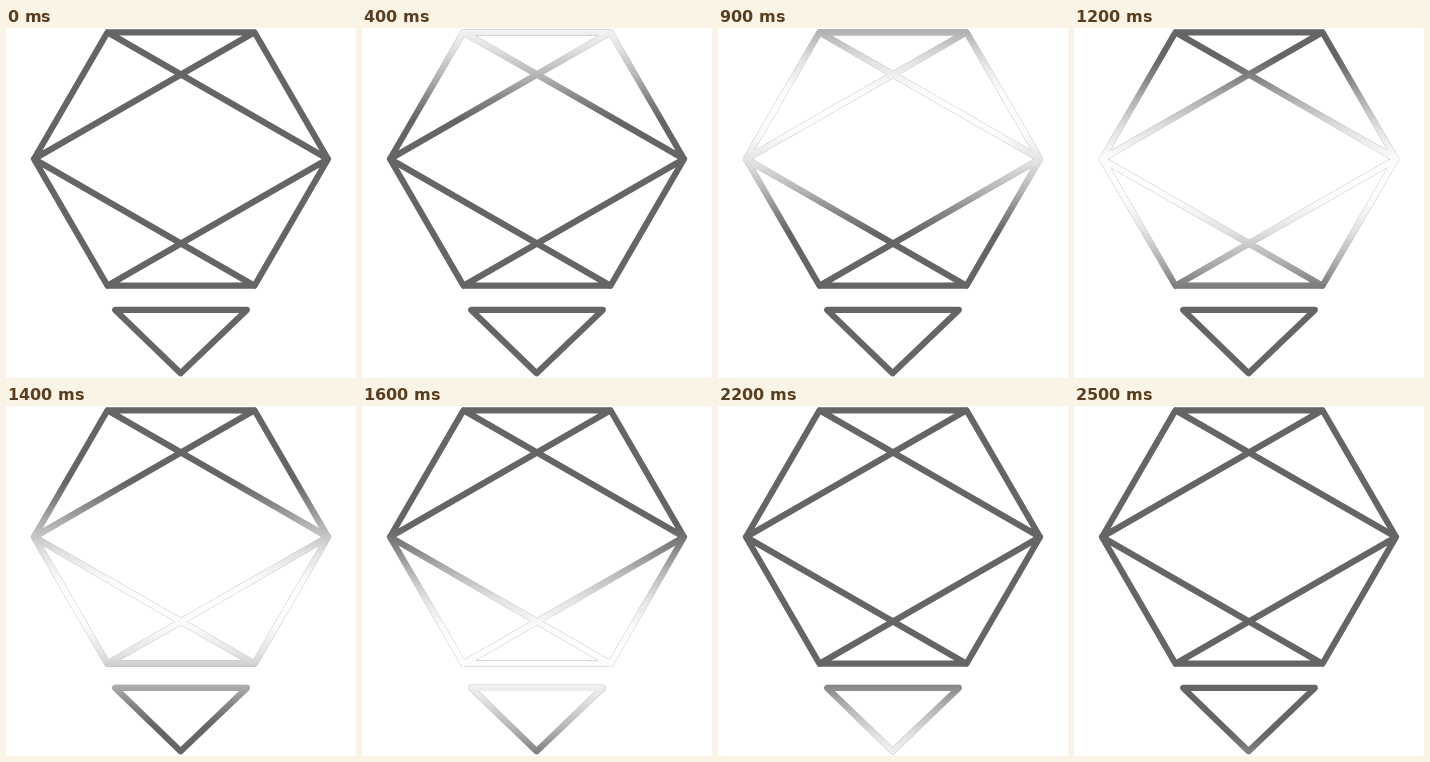
An HTML page with a canvas for the animation above (2.6 s loop, 350 by 350 pixels).

```html
<!DOCTYPE html>
<html lang="en">
<head>
<meta charset="utf-8">
<title>Shining gem</title>
<style>
  html, body { margin: 0; width: 100%; height: 100%; overflow: hidden; background: #fff; }
  canvas { display: block; }
</style>
</head>
<body>
<canvas id="stage" width="350" height="350"></canvas>
<script>
const ctx = document.getElementById('stage').getContext('2d');
const SIZE = 350, LOOP = 2600, STEP = 100, BAND = 244;

const gem = new Path2D(`
  M101.5 4.3H248.5L322 131L248.5 257.7H101.5L28 131Z
  M101.5 4.3L322 131L101.5 257.7
  M248.5 4.3L28 131L248.5 257.7
  M109.2 281.9H240.8L174.6 345.2Z`);

// Opacity of the shine by distance from its middle line
const falloff = [[0, 1], [24, .97], [50, .82], [80, .5], [102, .2], [122, 0]];

function shine(top) {
  const g = ctx.createLinearGradient(0, top, 0, top + BAND);
  for (const [d, a] of falloff) {
    for (const side of [-1, 1]) {
      g.addColorStop(.5 + side * d / BAND, `rgba(255,255,255,${a})`);
    }
  }
  return g;
}

function stroke(style) {
  ctx.strokeStyle = style;
  ctx.stroke(gem);
}

function draw(now) {
  const t = Math.floor(now % LOOP / STEP) * STEP;
  ctx.fillStyle = '#fff';
  ctx.fillRect(0, 0, SIZE, SIZE);
  ctx.lineWidth = 6.2;
  ctx.lineJoin = ctx.lineCap = 'round';
  stroke('#666465');
  stroke(shine(-BAND + (SIZE + BAND) * t / LOOP));
}

let start;
function tick(now) {
  start ??= now;
  draw(now - start);
  requestAnimationFrame(tick);
}
requestAnimationFrame(tick);
</script>
</body>
</html>
```
